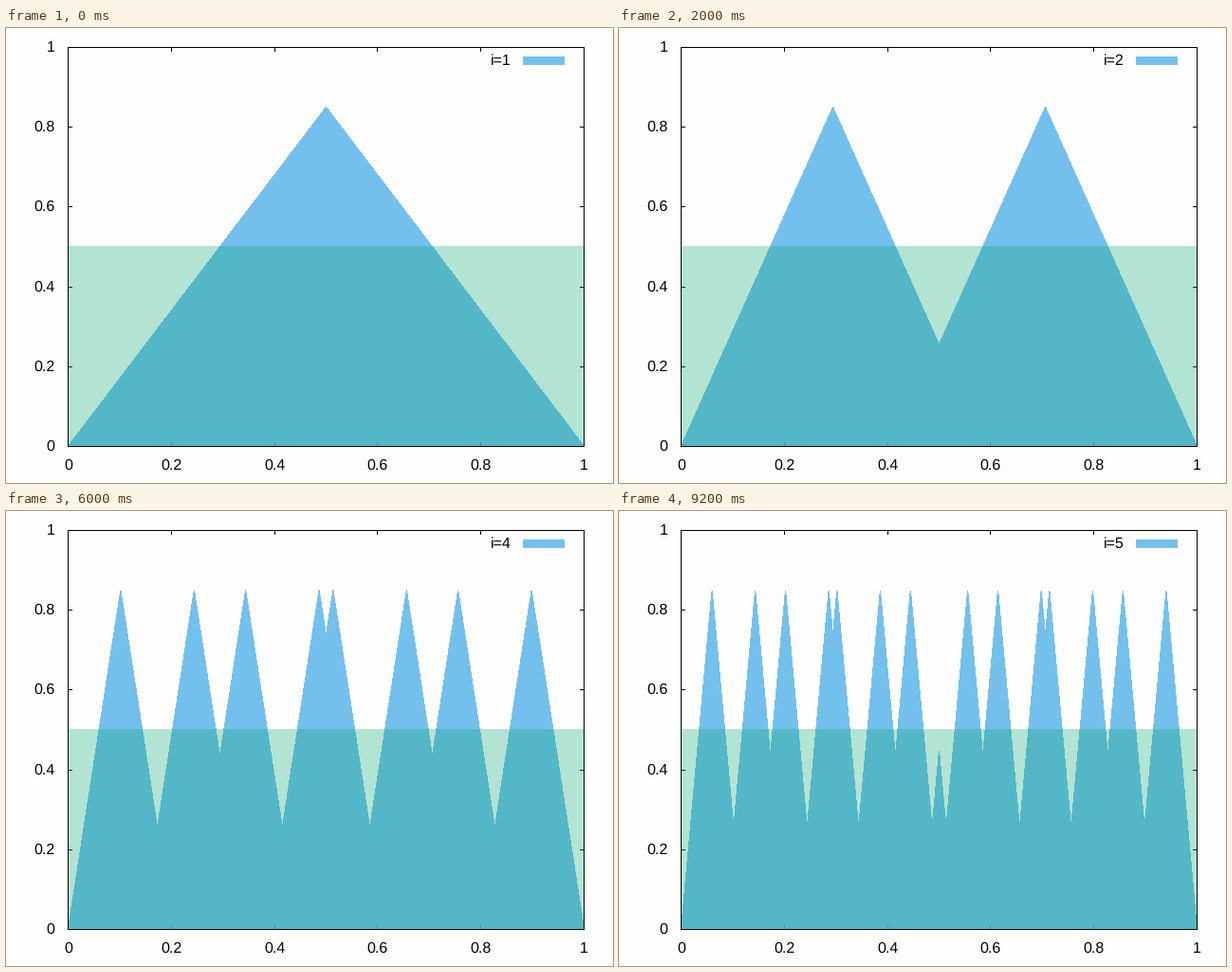
Recreate the animation shown at these times as a matplotlib script. Size 640x480 px, loop 10 s.

```python
import numpy as np
import matplotlib.pyplot as plt
from matplotlib.animation import FuncAnimation
from matplotlib.patches import Polygon, Rectangle

W, H, DPI = 640, 480, 96
LEFT, RIGHT, TOP, BOTTOM = 65, 609, 20, 441
TICK = 5
BACK, BLUE, GREEN = "#fdfefc", "#52b1e8", "#0aa574"
MU = 1.7
STEPS = 5

plt.rcParams["font.family"] = "Liberation Sans"
plt.rcParams["font.size"] = 12
plt.rcParams["text.hinting"] = "none"

fig = plt.figure(figsize=(W / DPI, H / DPI), dpi=DPI, facecolor=BACK)
ax = fig.add_axes([0, 0, 1, 1])
ax.set_xlim(0, W)
ax.set_ylim(H, 0)
ax.axis("off")


def px(x):
    return LEFT + 0.5 + (RIGHT - LEFT) * x


def py(y):
    return BOTTOM + 0.5 - (BOTTOM - TOP) * y


def box(x, y, w, h, color="black", alpha=1, z=1):
    ax.add_patch(Rectangle((x, y), w, h, fc=color, alpha=alpha, lw=0,
                           antialiased=False, snap=False, zorder=z))


def label(x, y, text, align):
    return ax.text(x, y, text, ha=align, va="baseline", color="black", zorder=6)


def tent(x, count):
    for _ in range(count):
        x = MU * np.minimum(x, 1 - x)
    return x


# Ticks lie under the translucent fills, the frame above them
for k in range(6):
    v = k / 5
    tx, ty = int(px(v)), int(py(v))
    if 0 < k < 5:
        box(tx, BOTTOM + 1 - TICK, 1, TICK)
        box(tx, TOP, 1, TICK)
        box(LEFT, ty, TICK, 1)
        box(RIGHT + 1 - TICK, ty, TICK, 1)
    label(px(v), 465.5, f"{v:g}", "center")
    label(51.5, ty + 5, f"{v:g}", "right")

xs = np.linspace(0, 1, 2001)
area = Polygon([(0, 0), (1, 0), (1, 1)], closed=True, fc=BLUE, alpha=0.8,
               lw=0, antialiased=False, snap=False, zorder=2)
ax.add_patch(area)
box(LEFT + 1, 230, RIGHT - LEFT - 1, BOTTOM - 230, GREEN, 0.3, 3)
box(545, 30, 44, 9, BLUE, 0.8, 2)
key = label(533, 39, "", "right")

for y in (TOP, BOTTOM):
    box(LEFT, y, RIGHT - LEFT + 1, 1, z=5)
for x in (LEFT, RIGHT):
    box(x, TOP, 1, BOTTOM - TOP + 1, z=5)


def update(n):
    area.set_xy(np.column_stack([px(xs), py(tent(xs, n + 1))]))
    key.set_text(f"i={n + 1}")
    return area, key


anim = FuncAnimation(fig, update, frames=STEPS, interval=2000,
                     repeat=True, repeat_delay=0, blit=False)
plt.show()
```
